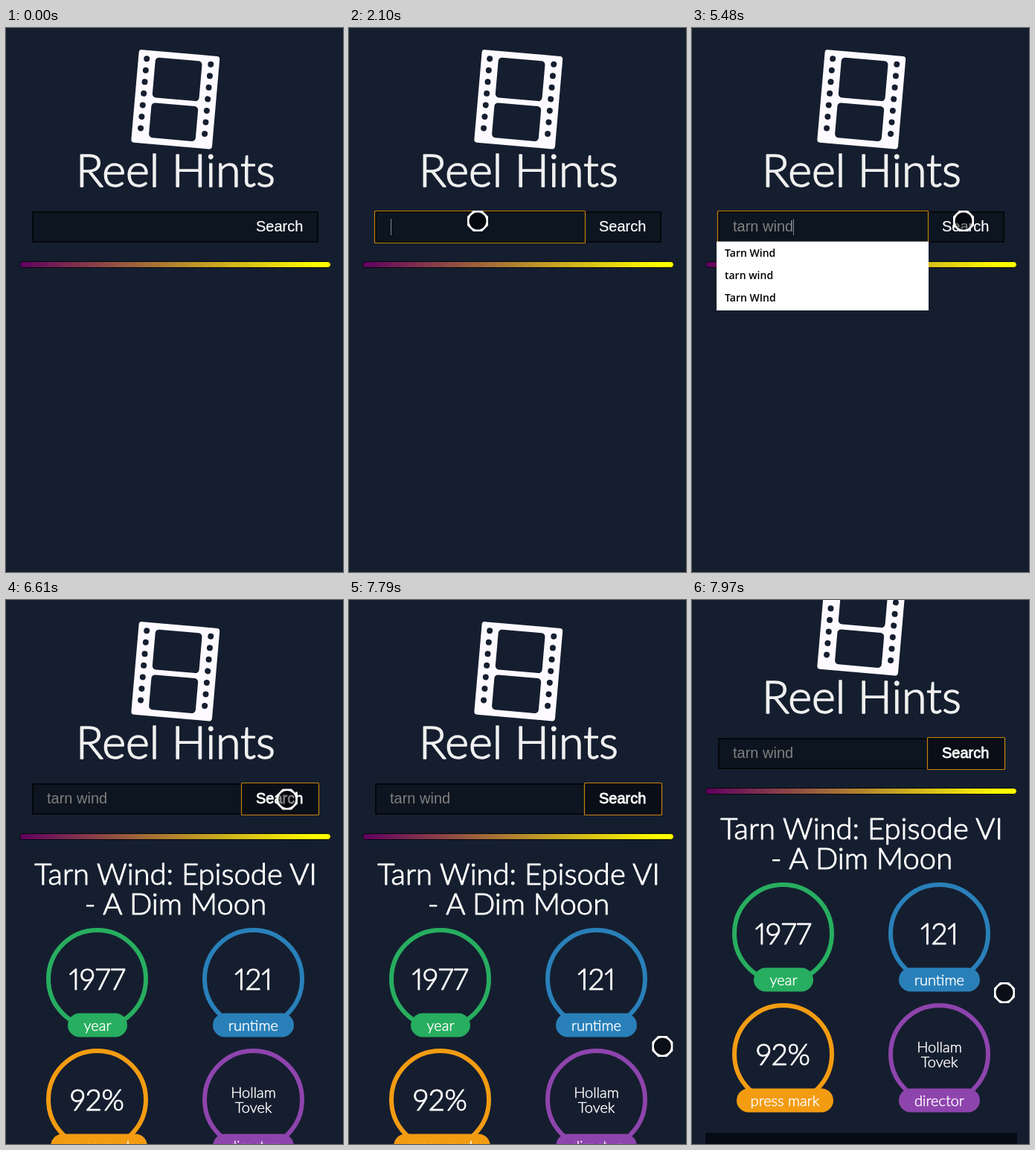
Animation, 453 px wide and 730 px high, one loop 8 s. Source, as an HTML page:

```html
<!DOCTYPE html>
<html lang="en">
<head>
<meta charset="utf-8">
<title>Reel Hints</title>
<style>
  html, body { margin: 0; width: 100%; height: 100%; overflow: hidden; background: #151e2f; }
  svg { display: block; width: 100%; height: 100%; }
  text { white-space: pre; }
  .round { font-family: Lato, "Open Sans", sans-serif; font-weight: 300; font-variant-numeric: proportional-nums;
    text-anchor: middle; fill: #fff; stroke: #fff; stroke-width: .025em; stroke-linejoin: round; }
  .plain { font: 20px "Liberation Sans", Arial, sans-serif; }
  .option { font: 600 14px "Open Sans", "Noto Sans", sans-serif; fill: #000; }
  .field { fill: #0d1520; stroke: #04070b; stroke-width: 2; }
  .focus { fill: none; stroke: #c5820b; stroke-width: 1.2; }
</style>
</head>
<body>
<svg viewBox="0 0 453 730">
  <defs>
    <linearGradient id="rainbow"><stop stop-color="#600060"/><stop offset=".96" stop-color="#ff0"/></linearGradient>
  </defs>
  <g id="page">
    <g transform="translate(227.8 95.8) rotate(5)">
      <rect x="-54.5" y="-62.5" width="109" height="125" rx="4" fill="#fdfaff"/>
      <g id="holes" fill="#151e2f">
        <rect x="-31.5" y="-54" width="63" height="54" rx="5"/>
        <rect x="-31.5" y="7" width="63" height="47" rx="5"/>
      </g>
    </g>
    <text class="round" x="228" y="213" font-size="61" style="fill:#f0f0f0;stroke:#f0f0f0">Reel Hints</text>

    <rect class="field" x="36" y="247" width="383" height="40"/>
    <g id="buttonFocus">
      <path d="M317 247V287" stroke="#04070b" stroke-width="2"/>
      <rect class="focus" x="316.5" y="245.5" width="104" height="43" rx="1" style="fill:#0a0e17"/>
    </g>
    <rect id="inputFocus" class="focus" x="34.5" y="245.5" width="283" height="43" rx="1"/>
    <text id="search" class="plain" x="336" y="273" fill="#fff" stroke="#fff">Search</text>
    <text id="typed" class="plain" x="55" y="273" fill="#808081"></text>
    <path id="caret" d="M.5 256V278" stroke="#85878a"/>

    <rect x="18.5" y="313.5" width="418" height="8" rx="4" fill="url(#rainbow)" stroke="#05070c"/>

    <g id="dropdown">
      <rect x="33" y="286.5" width="285" height="92.5" fill="#fff"/>
      <text class="option" x="44" y="307">Tarn Wind</text>
      <text class="option" x="44" y="337">tarn wind</text>
      <text class="option" x="44" y="367">Tarn WInd</text>
    </g>

    <g id="results">
      <text class="round" x="228" y="382" font-size="40">Tarn Wind: Episode VI</text>
      <text class="round" x="228" y="422" font-size="40">- A Dim Moon</text>
      <rect x="18" y="776" width="419" height="60" fill="#060c14"/>
    </g>
  </g>
  <g id="cursor">
    <circle r="11.5" fill="#000" fill-opacity=".5" stroke="#111"/>
    <path fill="#fff" fill-rule="evenodd"
      d="M-6-14H6L14-6V6L6 14H-6L-14 6V-6ZM-11.5 0a11.5 11.5 0 0 0 23 0a11.5 11.5 0 0 0-23 0Z"/>
  </g>
</svg>
<script>
const LOOP = 8000;
const el = id => document.getElementById(id);
const show = (id, on) => el(id).setAttribute('display', on ? 'inline' : 'none');
const linear = u => u;
const smooth = u => u * u * (3 - 2 * u);

for (let i = 0; i < 7; i++) {
  for (const x of [-43.2, 43.2]) {
    el('holes').insertAdjacentHTML('beforeend', `<circle cx="${x}" cy="${-51 + i * 15.6}" r="4"/>`);
  }
}

function addFact(x, y, color, label, pillLeft, pillWidth, lines) {
  const size = lines.length > 1 ? 20 : 39;
  const baseline = lines.length > 1 ? -3 : 14;
  const value = lines.map((line, i) =>
    `<text class="round" x="${x}" y="${y + baseline + i * 20}" font-size="${size}">${line}</text>`).join('');
  el('results').insertAdjacentHTML('beforeend', `
    <circle cx="${x}" cy="${y}" r="65.5" fill="none" stroke="${color}" stroke-width="6"/>
    <rect x="${pillLeft}" y="${y + 46}" width="${pillWidth}" height="32" rx="16" fill="${color}"/>
    <text class="round" x="${pillLeft + pillWidth / 2}" y="${y + 69}" font-size="20">${label}</text>
    ${value}`);
}
addFact(122.5, 508.5, '#27ae60', 'year', 83, 80, ['1977']);
addFact(332.5, 508.5, '#2980b9', 'runtime', 278, 109, ['121']);
addFact(122.5, 670.5, '#f39c12', 'press mark', 60, 130, ['92%']);
addFact(332.5, 670.5, '#8e44ad', 'director', 278, 109, ['Hollam', 'Tovek']);

// Each pointer move advances in discrete steps; bend lifts the middle of the path.
const moves = [
  { start: 1370, end: 1920, steps: 10, to: [173, 259] },
  { start: 2350, end: 2350, steps: 1, to: [180, 259] },
  { start: 4800, end: 5480, steps: 13, to: [365, 259], bend: -25 },
  { start: 5650, end: 5790, steps: 3, to: [375, 264] },
  { start: 6610, end: 7390, steps: 16, to: [420, 575], easeX: linear },
  { start: 7450, end: 7510, steps: 2, to: [422, 625] },
  { start: 7700, end: 7970, steps: 8, to: [420, 527], easeY: u => u ** 1.35 },
];

function pointerAt(t) {
  let [x, y] = [356, 399];
  for (const { start, end, steps, to, bend = 0, easeX = smooth, easeY = smooth } of moves) {
    if (t < start) break;
    const gap = (end - start) / Math.max(1, steps - 1);
    const step = gap ? Math.min(steps, Math.floor((t - start) / gap + 1.001)) : steps;
    const first = start === moves[0].start ? 1 : 0;
    const u = (step - first) / (steps - first);
    const v = easeY(u);
    x += (to[0] - x) * easeX(u);
    y += (to[1] - y) * v + bend * 4 * v * (1 - v);
  }
  return [x, y];
}

const query = 'tarn wind';
const keyTimes = [3080, 3240, 3420, 3510, 3780, 3960, 4080, 4200, 4330];
const blinkTimes = [2100, 2490, 2970, 4830, 5310, 5790];
const CLICK = 6010, RESULTS = 6120, DRAG = 7700, DRAG_START_Y = 588;

function draw(t) {
  const [x, y] = pointerAt(t);
  show('cursor', t >= moves[0].start);
  el('cursor').setAttribute('transform', `translate(${x} ${y})`);

  const scroll = t >= DRAG ? Math.max(0, DRAG_START_Y - y) : 0;
  el('page').setAttribute('transform', `translate(0 ${-scroll})`);

  const editing = t >= 2100 && t < CLICK;
  const count = keyTimes.filter(k => t >= k).length;
  el('typed').textContent = query.slice(0, count);
  const width = count ? el('typed').getComputedTextLength() : 0;
  el('caret').setAttribute('transform', `translate(${Math.round(55 + width + (count ? 0 : 1))} 0)`);
  show('caret', editing && blinkTimes.filter(b => t >= b).length % 2);

  show('inputFocus', editing);
  show('dropdown', t >= 3330 && t < CLICK);
  show('buttonFocus', t >= CLICK);
  el('search').setAttribute('stroke-width', t >= CLICK ? .8 : .2);
  show('results', t >= RESULTS);
}

function frame() {
  draw(performance.now() % LOOP);
  requestAnimationFrame(frame);
}
frame();
</script>
</body>
</html>
```
